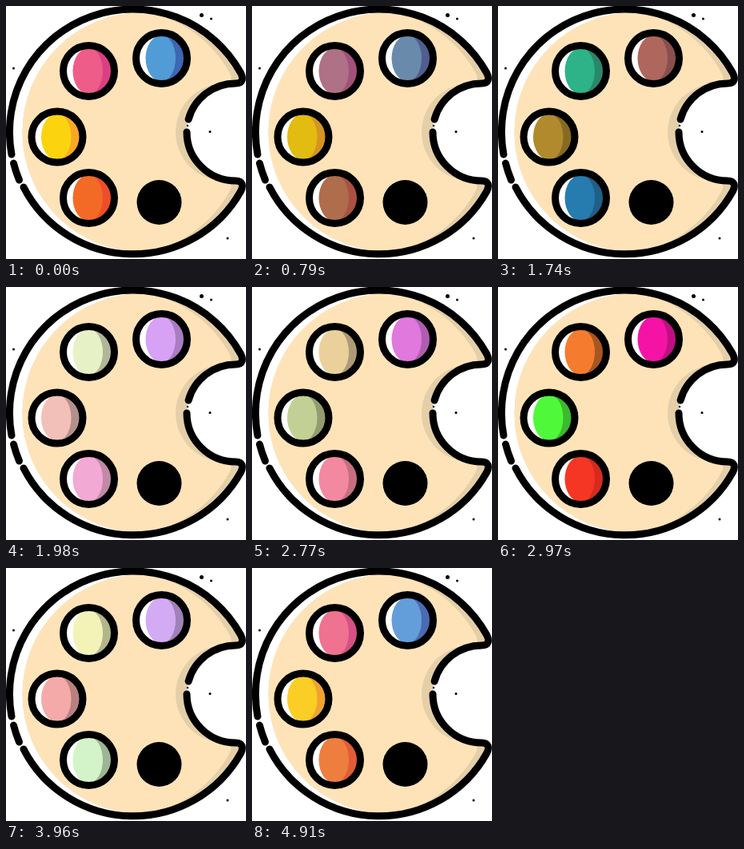
These frames come from a looping animation (300 px wide and 317 px high, 4950 ms). An HTML page:

```html
<!DOCTYPE html>
<html lang="en">
<head>
<meta charset="utf-8">
<title>Paint palette</title>
<style>
  html, body { margin: 0; width: 100%; height: 100%; overflow: hidden; background: #fff; }
  svg { display: block; width: 300px; height: 317px; }
  .line { fill: none; stroke: #000; stroke-width: 9; stroke-linecap: round; stroke-linejoin: round; }

  /* a–e: the five paints of each well; a2–e2: their shaded sides */
  .nw { --a: #ee5c89; --b: #0fa77c; --c: #e6f1c6; --d: #f57c2e; --e: #f3f3b8;
        --a2: #db3f83; --b2: #137f62; --c2: #b0b69a; --d2: #a9551f; --e2: #b3b58c; }
  .ne { --a: #519cd6; --b: #a85c44; --c: #d7a1f5; --d: #f513a6; --e: #d3abf4;
        --a2: #3c67b1; --b2: #83473a; --c2: #a97cc3; --d2: #be1082; --e2: #9f82b8; }
  .w  { --a: #fbd40f; --b: #a58114; --c: #f2c0b9; --d: #4ff93a; --e: #f4aaa9;
        --a2: #f9a826; --b2: #7f6410; --c2: #b4908b; --d2: #3cb92d; --e2: #b98080; }
  .sw { --a: #f36a26; --b: #0474a8; --c: #f2a9d3; --d: #f53624; --e: #d2f4c8;
        --a2: #ee4d2a; --b2: #055880; --c2: #c08aa8; --d2: #d62a1e; --e2: #9db596; }

  .paint { animation: paint 4950ms infinite steps(7); }
  .shade { animation: shade 4950ms infinite steps(7); }
  @keyframes paint {
    0%, 14.343% { fill: var(--a); }
    20%, 34.343% { fill: var(--b); }
    40%, 54.343% { fill: var(--c); }
    60%, 74.343% { fill: var(--d); }
    80%, 94.343% { fill: var(--e); }
    100% { fill: var(--a); }
  }
  @keyframes shade {
    0%, 14.343% { fill: var(--a2); }
    20%, 34.343% { fill: var(--b2); }
    40%, 54.343% { fill: var(--c2); }
    60%, 74.343% { fill: var(--d2); }
    80%, 94.343% { fill: var(--e2); }
    100% { fill: var(--a2); }
  }
</style>
</head>
<body>
<svg viewBox="0 0 300 317">
  <defs>
    <path id="board" d="M293.5 84C297 91 296 97 287 97A61 61 0 0 0 287 219C296 219 297 225 293.5 232A154 154 0 1 1 293.5 84Z"/>
    <clipPath id="inBoard"><use href="#board"/></clipPath>
    <clipPath id="inShifted"><use href="#board" x="-14"/></clipPath>
  </defs>

  <g clip-path="url(#inBoard)">
    <circle cx="170.5" cy="158" r="150" fill="#e5cfa8"/>
    <g clip-path="url(#inShifted)"><circle cx="170.5" cy="158" r="150" fill="#ffe3b8"/></g>
  </g>

  <g class="line">
    <path d="M7 186A154 154 0 0 1 293.5 84C297 91 296 97 287 97A61 61 0 0 0 228.1 142"/>
    <path d="M226 158A61 61 0 0 0 287 219C296 219 297 225 293.5 232A154 154 0 0 1 22 227"/>
    <path d="M16.5 218A154 154 0 0 1 9.5 197"/>
  </g>

  <g class="nw" transform="translate(103.5 81.5)">
    <circle r="30" fill="#fff"/>
    <path class="shade" d="M0-30A30 30 0 0 1 0 30Z"/>
    <path class="paint" d="M0-29A20 29 0 0 0 0 29A17.5 29 0 0 0 0-29Z"/>
    <circle class="line" r="32"/>
  </g>
  <g class="ne" transform="translate(194.5 65.5)">
    <circle r="30" fill="#fff"/>
    <path class="shade" d="M0-30A30 30 0 0 1 0 30Z"/>
    <path class="paint" d="M0-29A20 29 0 0 0 0 29A17.5 29 0 0 0 0-29Z"/>
    <circle class="line" r="32"/>
  </g>
  <g class="w" transform="translate(64 164)">
    <circle r="30" fill="#fff"/>
    <path class="shade" d="M0-30A30 30 0 0 1 0 30Z"/>
    <path class="paint" d="M0-29A20 29 0 0 0 0 29A17.5 29 0 0 0 0-29Z"/>
    <circle class="line" r="32"/>
  </g>
  <g class="sw" transform="translate(103.5 240.5)">
    <circle r="30" fill="#fff"/>
    <path class="shade" d="M0-30A30 30 0 0 1 0 30Z"/>
    <path class="paint" d="M0-29A20 29 0 0 0 0 29A17.5 29 0 0 0 0-29Z"/>
    <circle class="line" r="32"/>
  </g>
  <circle cx="191.5" cy="246" r="28"/>

  <!-- specks -->
  <circle cx="244.5" cy="11.5" r="2.5"/>
  <circle cx="256.5" cy="16" r="1.5"/>
  <circle cx="9.5" cy="78" r="1.5"/>
  <circle cx="255" cy="157.5" r="1.5"/>
  <circle cx="277" cy="291" r="1.5"/>
  <circle cx="227" cy="150" r="1.2"/>
</svg>
</body>
</html>
```
